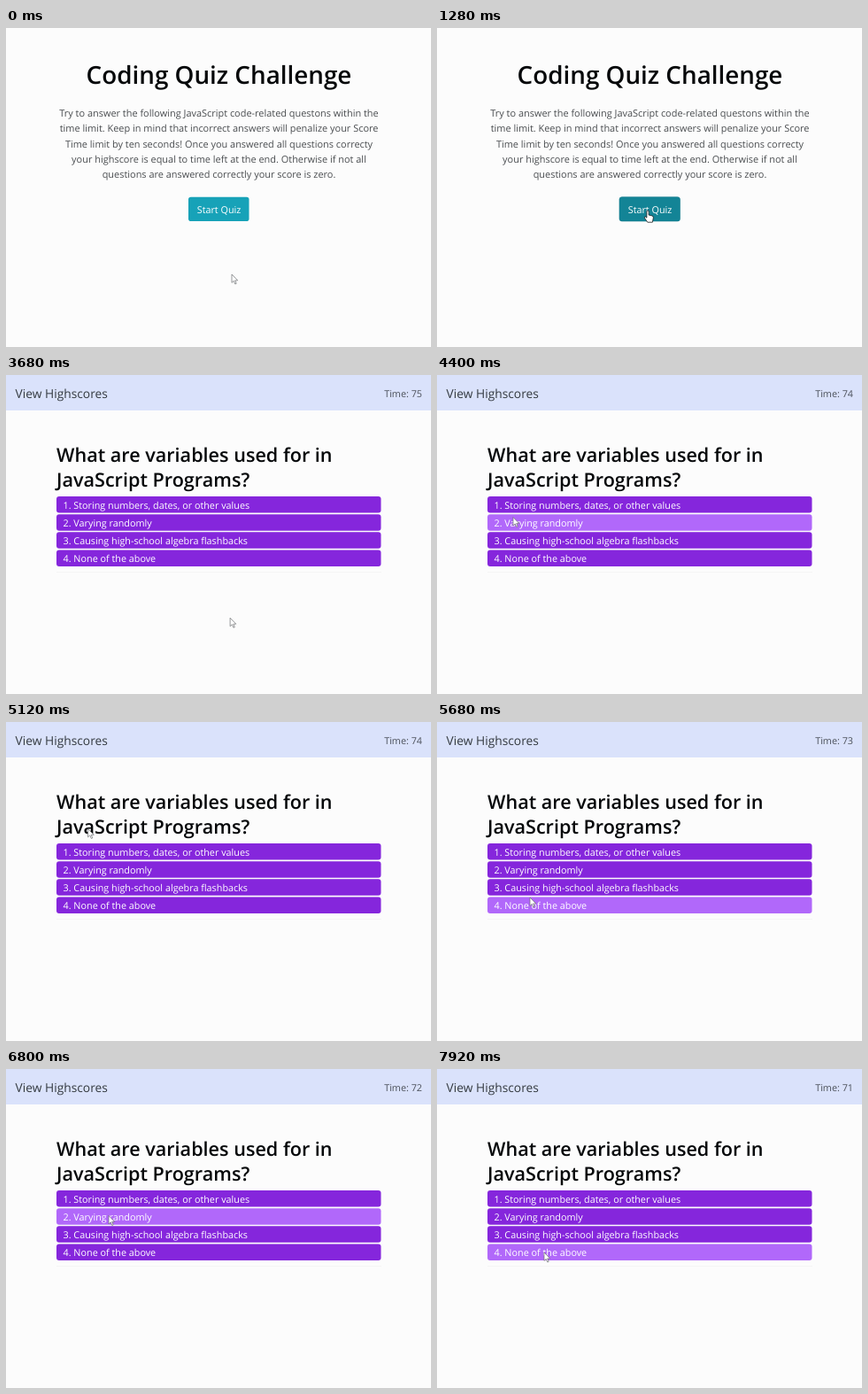
An HTML page for the animation above (8 s loop, 480x360 px).

```html
<!DOCTYPE html>
<html lang="en">
<head>
<meta charset="utf-8">
<title>Coding Quiz Challenge</title>
<style>
  html, body { margin: 0; width: 100%; height: 100%; overflow: hidden; background: #fcfcfc; }
  svg { display: block; width: 480px; height: 360px; }
  text { font: 10.8px "Open Sans", "Noto Sans", sans-serif; text-rendering: geometricPrecision; white-space: pre; }
  .mid { text-anchor: middle; }
  .title { font-size: 27.8px; font-weight: 600; fill: #06080a; }
  .intro { font-size: 10.95px; fill: #4a4d50; }
  .ask { font-size: 21.6px; font-weight: 600; fill: #06080a; }
  .nav { font-size: 13.8px; fill: #343a40; }
  .time { fill: #4b505a; text-anchor: end; }
  .light { fill: #fff; }
  #start rect { fill: #17a2b8; }
  #start.hover rect { fill: #138496; stroke: #117a8b; stroke-width: .6; }
  .row rect { fill: #8526dc; }
  .row.hover rect { fill: #b168fa; }
  #cursor path { fill: #fff; stroke-width: .7; stroke-linejoin: round; }
  #arrow { stroke: #6a6d70; }
  #hand { stroke: #15181a; }
</style>
</head>
<body>
<svg viewBox="0 0 480 360">
  <rect width="480" height="360" fill="#fcfcfc"/>
  <g id="intro">
    <text class="mid title" x="240.5" y="63">Coding Quiz Challenge</text>
    <g id="lines"></g>
    <g id="start">
      <rect x="206" y="190.7" width="68.5" height="27.3" rx="2.8"/>
      <text class="mid light" x="240.5" y="209">Start Quiz</text>
    </g>
  </g>
  <g id="quiz">
    <rect width="480" height="40" fill="#dae2fb"/>
    <text class="nav" x="10.5" y="25.7">View Highscores</text>
    <text class="time" id="time" x="470" y="25">Time: 00</text>
    <text class="ask" x="57" y="98">What are variables used for in</text>
    <text class="ask" x="57" y="126">JavaScript Programs?</text>
    <g id="rows"></g>
    <path d="M57 222.5H424" stroke="#f5f5f5"/>
  </g>
  <g id="cursor">
    <path id="arrow" d="M0 0V9.4L2.2 7.4L3.8 11L5.2 10.4L3.7 6.9H6.7Z"/>
    <path id="hand" transform="scale(1.12)" d="M-1 .9A1 1 0 0 1 1 .9V4.5L4.4 5.3Q5.8 5.7 5.7 7.2L4.8 11.8H-.2L-3.2 7.4Q-3.4 5.9-2.2 6.3L-1 7.3Z"/>
  </g>
</svg>
<script>
  const LOOP = 8000, STEP = 80, OPEN = 2160, LEAVE = 2400, TICK = 3280;
  const ROW_TOP = 137, ROW_GAP = 20.15, ROW_H = 18.5;

  const intro = [
    "Try to answer the following JavaScript code-related questons within the",
    "time limit. Keep in mind that incorrect answers will penalize your Score",
    "Time limit by ten seconds! Once you answered all questions correcty",
    "your highscore is equal to time left at the end. Otherwise if not all",
    "questions are answered correctly your score is zero."
  ];
  const answers = [
    "Storing numbers, dates, or other values",
    "Varying randomly",
    "Causing high-school algebra flashbacks",
    "None of the above"
  ];
  // Pointer moves: each eases to a point, then rests
  const moves = [
    { at: 80, for: 320, to: [238, 245] },
    { at: 560, for: 480, to: [238, 206] },
    { at: LEAVE, for: 400, to: [262, 246] },
    { at: 3520, for: 240, to: [250, 284] },
    { at: 3760, for: 640, to: [86, 160.5] },
    { at: 4400, for: 320, to: [92, 117] },
    { at: 5040, for: 640, to: [105, 198] },
    { at: 6080, for: 720, to: [116, 165.5] },
    { at: 6960, for: 960, to: [121, 207] }
  ];

  const $ = id => document.getElementById(id);
  const show = (el, on) => el.setAttribute("visibility", on ? "visible" : "hidden");
  const clamp = k => Math.min(1, Math.max(0, k));
  const ease = k => k * k * (3 - 2 * k);

  $("lines").innerHTML = intro.map((line, i) =>
    `<text class="mid intro" x="240.5" y="${100 + i * 17.25}">${line}</text>`).join("");
  $("rows").innerHTML = answers.map((answer, i) =>
    `<g class="row" transform="translate(57 ${ROW_TOP + i * ROW_GAP})">
      <rect width="366.5" height="${ROW_H}" rx="3"/>
      <text class="light" x="7.5" y="13.6">${i + 1}. ${answer}</text></g>`).join("");
  const rows = [...document.querySelectorAll(".row")];

  function pointer(t) {
    return moves.reduce(([x, y], move) => {
      const k = ease(clamp((t - move.at) / move.for));
      return [x + (move.to[0] - x) * k, y + (move.to[1] - y) * k];
    }, [255, 278]);
  }

  function draw(t) {
    const [x, y] = pointer(t);
    const quiz = t >= OPEN;
    const onStart = t <= LEAVE && y < 218;
    show($("intro"), !quiz);
    show($("quiz"), quiz);
    show($("hand"), onStart);
    show($("arrow"), !onStart);
    $("cursor").setAttribute("transform", `translate(${x} ${y})`);
    $("start").classList.toggle("hover", onStart);
    rows.forEach((row, i) => {
      const dy = y - ROW_TOP - i * ROW_GAP;
      row.classList.toggle("hover", t > LEAVE && dy >= 0 && dy < ROW_H);
    });
    const left = t < TICK ? "00" : 75 - Math.floor((t - TICK) / 1000);
    $("time").textContent = "Time: " + left;
  }

  const begin = performance.now();
  function frame() {
    const t = (performance.now() - begin) % LOOP;
    draw(Math.floor(t / STEP) * STEP);
    requestAnimationFrame(frame);
  }
  frame();
</script>
</body>
</html>
```
